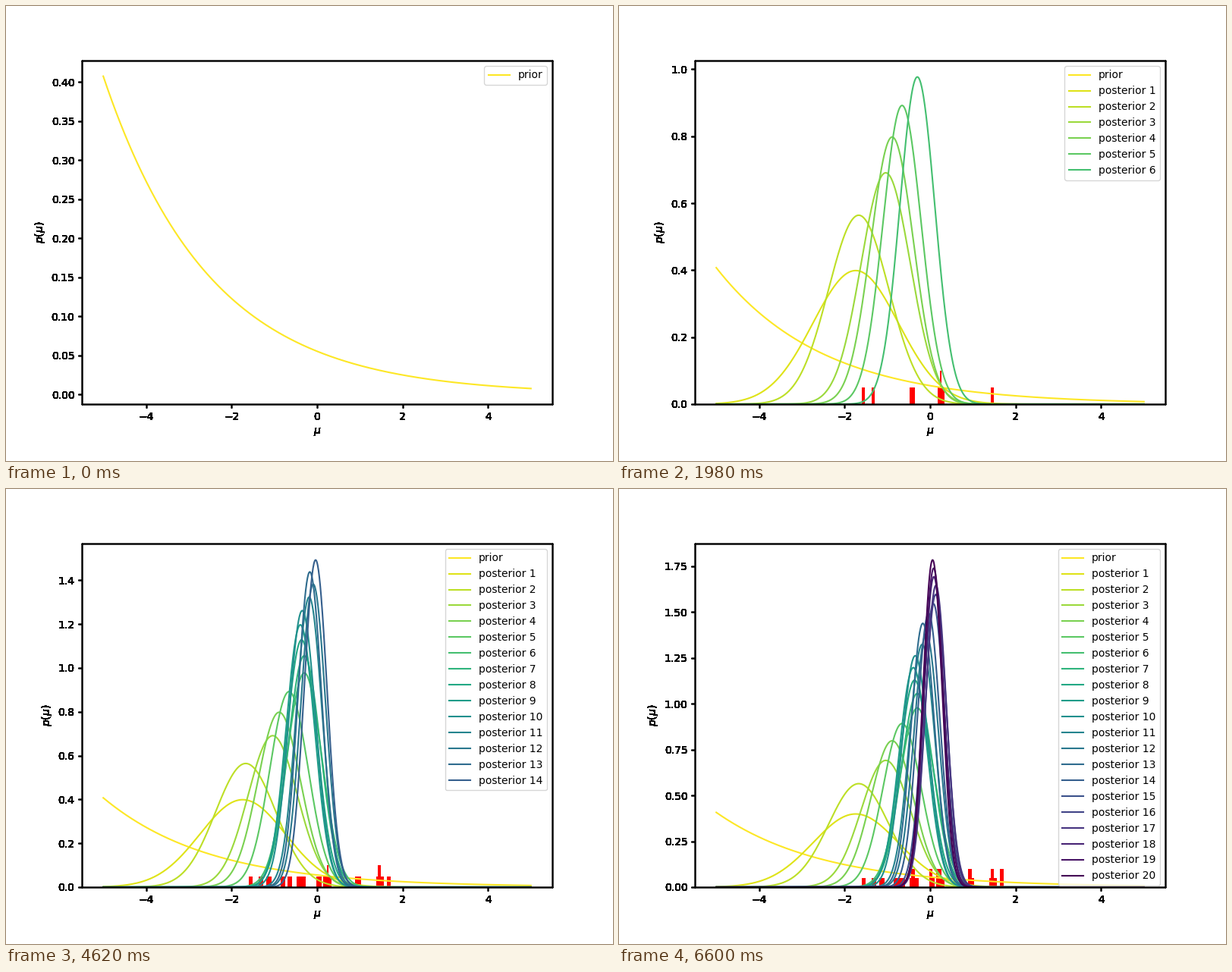
Write a matplotlib script that moves like this. It is 800x600 px and loops after 6930 ms.

```python
import numpy as np
import matplotlib.pyplot as plt
from matplotlib.animation import FuncAnimation
from matplotlib.artist import Artist

RATE = 0.4      # slope of the exponential prior
BINS = 40
BAR = 0.05      # rug height per observation
PASSES = 20     # repeated strokes that give the heavy axes

DATA = np.array([-1.34, -1.597, 0.225, -0.435, 0.27, 1.49, -0.32, -0.79,
                 -0.63, 0.05, 1.44, 0.96, -1.13, 1.72, 1.67, 0.93,
                 0.19, -0.73, 0.02, -0.42])
N = len(DATA)
MU = np.linspace(-5, 5, 1000)
CMAP = plt.get_cmap("viridis_r")


class HeavyAxes(Artist):
    """Strokes spines, ticks and labels again so their edges build up."""

    zorder = 2.6

    def draw(self, renderer):
        ax = self.axes
        parts = list(ax.spines.values())
        for axis in (ax.xaxis, ax.yaxis):
            lo, hi = sorted(axis.get_view_interval())
            parts += [t for t in axis.get_major_ticks()
                      if lo <= t.get_loc() <= hi]
            parts.append(axis.label)
        for _ in range(PASSES):
            for part in parts:
                part.draw(renderer)


def prior(mu):
    return RATE * np.exp(-RATE * mu) / (2 * np.sinh(5 * RATE))


def posterior(mu, n):
    mean = DATA[:n].mean() - RATE / n
    return np.sqrt(n / (2 * np.pi)) * np.exp(-n * (mu - mean) ** 2 / 2)


def rug(n):
    counts, edges = np.histogram(DATA[:n], BINS)
    used = counts > 0
    ax.bar(edges[:-1][used], BAR * counts[used], np.diff(edges)[used],
           align="edge", color="red")


def update(step):
    ax.clear()
    ax.plot(MU, prior(MU), color=CMAP(0.0), label="prior")
    for n in range(1, step + 1):
        ax.plot(MU, posterior(MU, n), color=CMAP(n / N),
                label=f"posterior {n}")
        rug(n)
    ax.set_xlabel(r"$\mu$")
    ax.set_ylabel(r"$p(\mu)$")
    ax.legend(loc="upper right")
    ax.add_artist(HeavyAxes())
    return []


fig, ax = plt.subplots(figsize=(8, 6), dpi=100)
fig.subplots_adjust(left=0.125, right=0.9, bottom=0.125, top=0.88)

anim = FuncAnimation(fig, update, frames=N + 1, init_func=lambda: [],
                     interval=330, repeat=True, repeat_delay=0)
plt.show()
```
